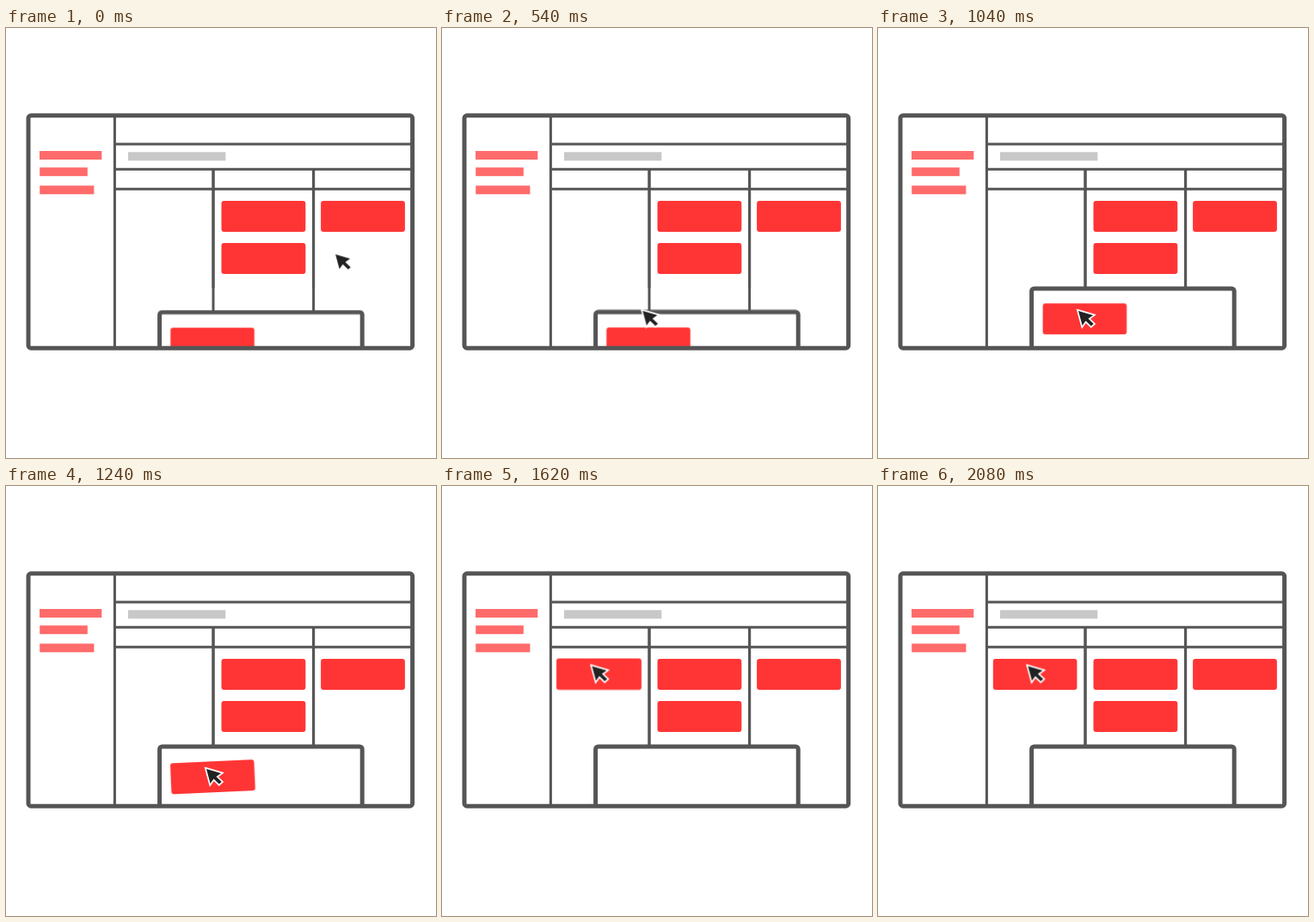
Animation of 500x500 px, one loop 3 s. Source, as an HTML page:

```html
<!DOCTYPE html>
<html lang="en">
<head>
<meta charset="utf-8">
<title>Drag a card onto the board</title>
<style>
  html, body { margin: 0; width: 100%; height: 100%; overflow: hidden; background: #fff; }
  svg { display: block; width: 100%; height: 100%; }

  .frame, .rule { fill: none; stroke: #555; }
  .frame { stroke-width: 5; }
  .rule { stroke-width: 3; }
  .panel { fill: #fff; }
  .menu { fill: #ff6b6b; }
  .card { fill: #ff3535; }
  .arrow { fill: #222; stroke: #fff; stroke-width: 3.4; paint-order: stroke; }

  .panel, .carry, .tilt, .pop, .blur, .cursor {
    --move: cubic-bezier(.65, 0, .35, 1);
    animation: 3s var(--move) infinite both;
  }
  .tilt, .pop { transform-box: fill-box; transform-origin: center; }
  .panel { animation-name: rise; }
  .carry { animation-name: carry; }
  .tilt { animation-name: tilt; }
  .pop { animation-name: pop; }
  .blur { animation-name: blur; }
  .cursor { animation-name: point; }

  @keyframes rise {
    0%, 17.17% { transform: translateY(27.5px); }
    26.17%, 100% { transform: none; }
  }
  @keyframes carry {
    0%, 17.33% { transform: translate(57.4px, 147.5px); }
    24.67%, 43.33% { transform: translate(57.8px, 119.3px); }
    52%, 100% { transform: translate(0, 0); }
  }
  @keyframes tilt {
    0%, 34.67% { transform: rotate(0deg); animation-timing-function: ease-out; }
    36.83% { transform: rotate(2.6deg); animation-timing-function: ease-in-out; }
    41.17% { transform: rotate(-2.6deg); animation-timing-function: ease-in; }
    43.33%, 100% { transform: rotate(0deg); }
  }
  @keyframes blur {
    0%, 43.33% { filter: blur(0); }
    47.67% { filter: blur(1.6px); }
    52%, 100% { filter: blur(0); }
  }
  @keyframes pop {
    0%, 52.33% { transform: translate(0, 0) scale(1); }
    60.83% { transform: translate(-2.7px, -5px) scale(1.34); }
    69.33%, 100% { transform: translate(0, 0) scale(1); }
  }
  @keyframes point {
    0%, 6.83% { transform: translate(383.1px, 263.2px); }
    18.67%, 43.33% { transform: translate(233px, 329px); }
    52%, 100% { transform: translate(174.4px, 209.5px); }
  }
</style>
</head>
<body>
<svg viewBox="0 0 500 500">
  <clipPath id="inside"><rect x="26" y="101" width="447" height="271"/></clipPath>

  <g class="menu">
    <rect x="39" y="143" width="72.3" height="10"/>
    <rect x="39.2" y="162.2" width="55.6" height="10"/>
    <rect x="39.2" y="183.3" width="63.2" height="10"/>
  </g>
  <rect x="142" y="144.3" width="113.3" height="10" fill="#c8c8c8"/>

  <path class="rule" d="M126.4 102V372M126 135H472M126 164.3H472M126 187.3H472M241 164V340M357.6 164V340"/>

  <g class="card">
    <rect x="250.5" y="201" width="97.8" height="36" rx="3"/>
    <rect x="250.5" y="250" width="97.8" height="36" rx="3"/>
    <rect x="366.1" y="201" width="97.8" height="36" rx="3"/>
  </g>

  <g clip-path="url(#inside)">
    <rect class="frame panel" x="178.6" y="303" width="235.6" height="90" rx="3"/>
    <g class="carry"><g class="tilt"><g class="blur">
      <rect class="card pop" x="133.8" y="201" width="97.6" height="36" rx="3"/>
    </g></g></g>
  </g>

  <!-- dividers stay above the dragged card -->
  <path class="rule" d="M241 164V302M357.6 164V302"/>
  <rect class="frame" x="26" y="101.8" width="446.6" height="270.4" rx="3"/>

  <g class="cursor">
    <path class="arrow" d="M0 0L17 5L11.4 9L17.7 14.9L14.8 17.6L8.5 11.5L4.6 17Z"/>
  </g>
</svg>
</body>
</html>
```
